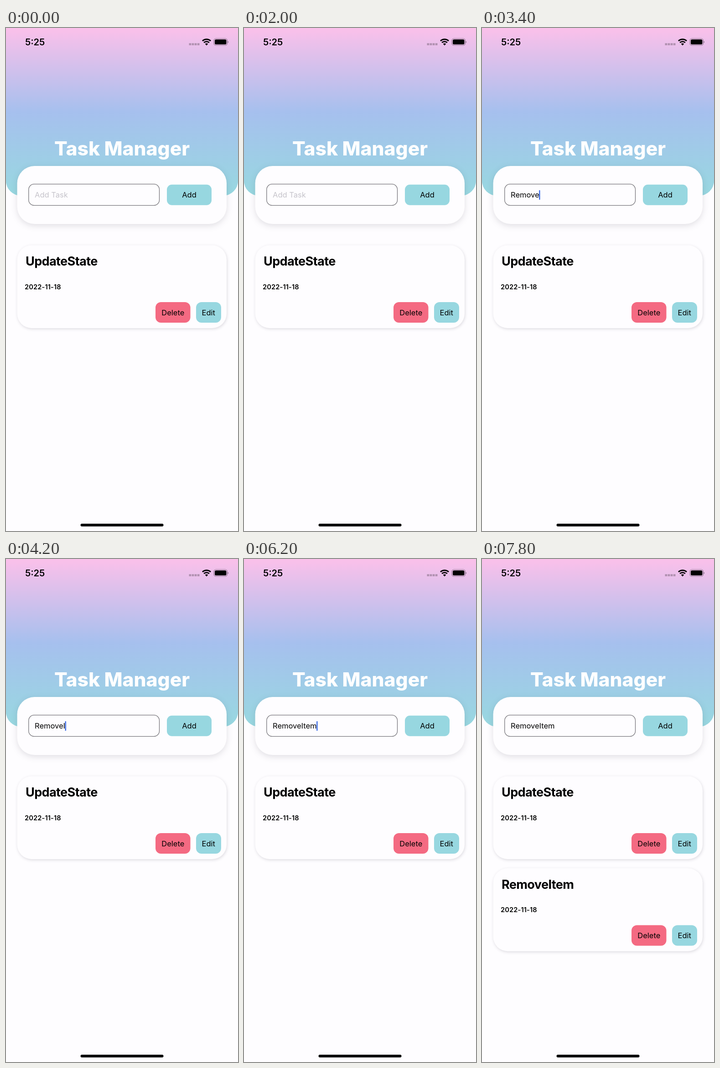
Animation of 509 by 1101 pixels, one loop 8000 ms. Source, as an HTML page:

```html
<!DOCTYPE html>
<html lang="en">
<head>
<meta charset="utf-8">
<title>Task list</title>
<style>
  html, body { margin: 0; width: 100%; height: 100%; overflow: hidden; background: #fefdff; }
  svg { display: block; width: 100%; height: 100%; font: 16.5px Inter, Roboto, sans-serif; }
  .mid { text-anchor: middle; }
  .panel { fill: #fefdff; filter: drop-shadow(0 4px 7px rgba(30, 20, 50, .13)); }
  .card { fill: #fefdff; filter: drop-shadow(1px 2px 3px rgba(30, 20, 50, .15)); }
  .name { font-size: 27px; font-weight: 700; letter-spacing: -.6px; }
  .date { font-size: 14.5px; font-weight: 600; letter-spacing: .2px; }
  .blue { fill: #97d7e0; }
  .red { fill: #f46a82; }
</style>
</head>
<body>
<svg viewBox="0 0 509 1101">
  <defs>
    <linearGradient id="sky" x2="0" y2="1">
      <stop stop-color="#fbc0ea"/>
      <stop offset=".5" stop-color="#a6c0ee"/>
      <stop offset="1" stop-color="#98d8e0"/>
    </linearGradient>
    <g id="task">
      <rect class="card" x="24.5" y="475.5" width="459.5" height="181.5" rx="32"/>
      <text class="date" x="41" y="571.5">2022-11-18</text>
      <rect class="red" x="328" y="600" width="76.5" height="45" rx="12"/>
      <text class="mid" x="366.3" y="628.5">Delete</text>
      <rect class="blue" x="417" y="600" width="55" height="45" rx="12"/>
      <text class="mid" x="444.3" y="628.5">Edit</text>
    </g>
  </defs>

  <rect y="-50" width="509" height="417" rx="33" fill="#98d8e0"/>
  <path d="M0 0H509V334a33 33 0 0 1-33 33H33a33 33 0 0 1-33-33z" fill="url(#sky)"/>

  <!-- status bar -->
  <text x="42" y="38" font-size="20" font-weight="600">5:25</text>
  <path d="M401.5 35.5h23" stroke="#000" stroke-opacity=".25" stroke-width="4.6" stroke-dasharray="4.8 1.3"/>
  <g fill="none" stroke="#000" stroke-width="2.9">
    <path d="M431 28.3a13 13 0 0 1 18 0M434.2 32a8.2 8.2 0 0 1 11.6 0"/>
    <path d="M440 38.2l-3.2-3.4a4.6 4.6 0 0 1 6.4 0z" fill="#000" stroke="none"/>
  </g>
  <rect x="456" y="23" width="29.5" height="15" rx="4.6" fill="none" stroke="#000" stroke-opacity=".4" stroke-width="1.2"/>
  <rect x="458" y="25" width="25.5" height="11" rx="2.8"/>
  <path d="M486.6 28.2q3 2.4 0 4.8z" fill-opacity=".45"/>

  <text class="mid" x="254.5" y="279" font-size="42.5" font-weight="800" fill="#fff">Task Manager</text>

  <!-- entry form -->
  <rect class="panel" x="24.5" y="302" width="459.5" height="127" rx="38"/>
  <rect x="49.7" y="341.7" width="286.8" height="46.6" rx="12" fill="none" stroke="#77757b" stroke-width="1.3"/>
  <text id="entry" x="63" y="371.3"></text>
  <rect id="caret" y="355" width="2.4" height="21" rx="1" fill="#3b6be6"/>
  <rect class="blue" x="353" y="342.8" width="98" height="45" rx="11"/>
  <text class="mid" x="402" y="371.3">Add</text>

  <!-- list -->
  <use href="#task"/>
  <text class="name" x="43" y="520">UpdateState</text>
  <g id="added" transform="translate(0 201.5)">
    <use href="#task"/>
    <text class="name" x="43" y="520">RemoveItem</text>
  </g>

  <rect x="163.5" y="1085" width="182" height="6" rx="3"/>
</svg>
<script>
  const LOOP = 8000, STEP = 200, FOCUS = 2600, ADDED = 7600;
  const word = "RemoveItem";
  const keys = [2800, 2900, 3000, 3200, 3300, 3400, 4200, 4400, 4800, 5200];
  const [entry, caret, added] = ["entry", "caret", "added"].map(id => document.getElementById(id));

  // The caret stays lit for half a second after each key, then blinks.
  function caretAlpha(t, typed) {
    if (t < FOCUS || t >= ADDED) return 0;
    if (!typed) return .45;
    return (t - keys[typed - 1]) % 1000 < 500 ? 1 : 0;
  }

  function draw(now) {
    const t = Math.floor(now % LOOP / STEP) * STEP;
    const typed = keys.filter(k => k <= t).length;
    entry.textContent = typed ? word.slice(0, typed) : "Add Task";
    entry.setAttribute("fill", typed ? "#000" : "#c6c4cb");
    caret.setAttribute("x", 62.5 + (typed ? entry.getComputedTextLength() : 0));
    caret.setAttribute("opacity", caretAlpha(t, typed));
    added.setAttribute("visibility", t >= ADDED ? "visible" : "hidden");
  }

  const start = performance.now();
  function tick() {
    draw(performance.now() - start);
    requestAnimationFrame(tick);
  }
  tick();
</script>
</body>
</html>
```
